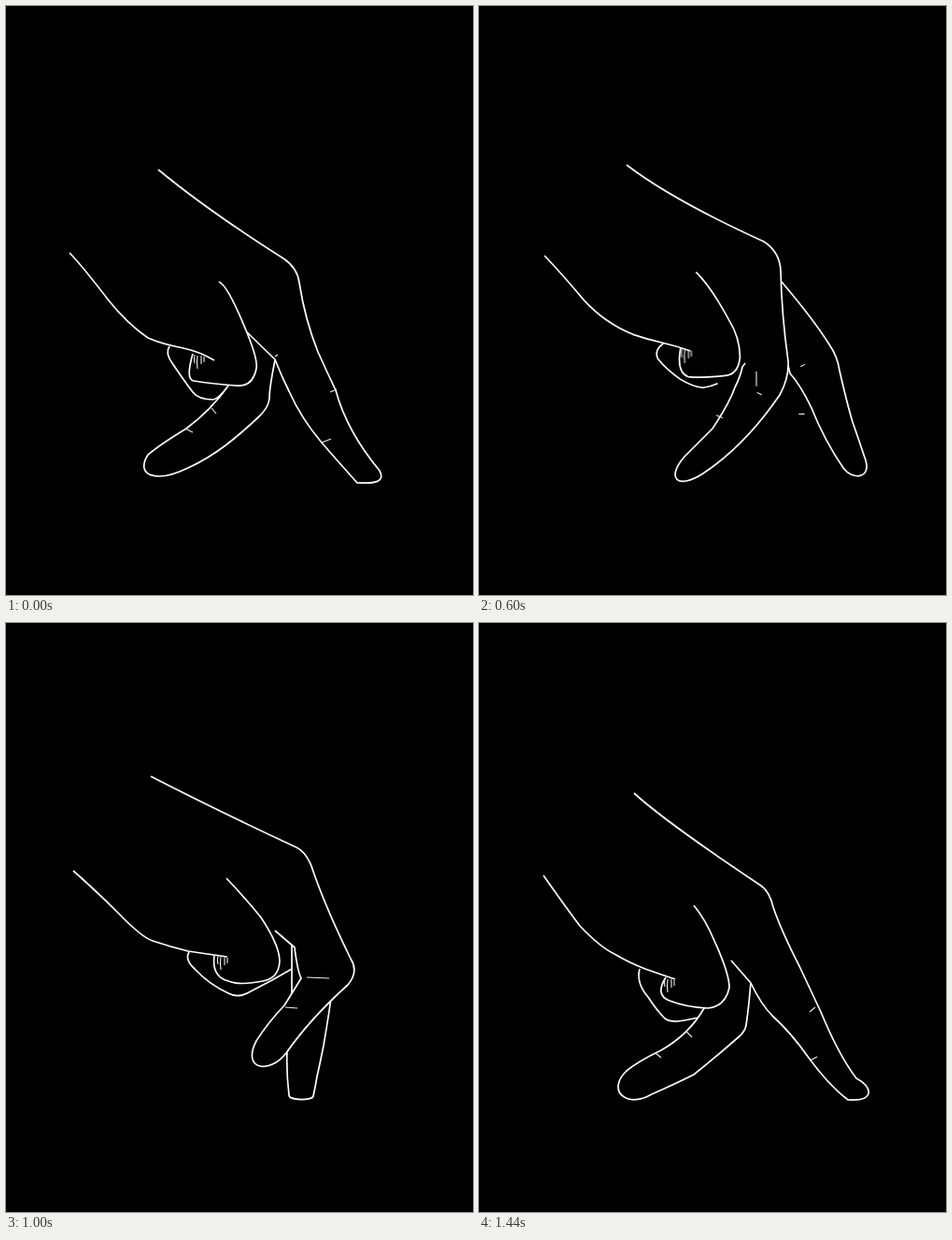
An HTML page without scripts that plays this animation: 500 px wide and 630 px high, repeating every 1.48 s.

```html
<!DOCTYPE html>
<html lang="en">
<head>
<meta charset="utf-8">
<title>Walking fingers</title>
<style>
html, body { margin: 0; height: 100%; overflow: hidden; background: #000; }
svg { display: block; width: 100vw; height: 100vh; }
path { fill: #000; stroke: #fff; stroke-width: 1.7; stroke-linejoin: round; animation: 1480ms steps(4) infinite; }
.line { fill: none; }
.fine { fill: none; stroke: #eee; stroke-width: 1.1; }
#far { animation-name: far; }
#curl { animation-name: curl; }
#near { animation-name: near; }
#thumb { animation-name: thumb; }
#palm { animation-name: palm; }
#nail { animation-name: nail; transform: translate(202px, 373px); }
#creases { animation-name: creases; }

/* Each pose is held for 40 ms; the first pose is the element's own shape. */
@keyframes far {
  10.81% { d: path("M298 428Q285 440 275 447Q262 460 249 460Q240 460 228 458Q215 457 205 458C178 456 182 424 215 423Q235 422 244 421Q262 402 281 389L283 387"); animation-timing-function: steps(6); }
  27.02% { d: path("M323 274Q365 318 383 337Q390 343 387 352Q380 398 371 427Q348 444 331 468C322 480 308 472 313 451Q325 430 337 412Q338 385 336 369L329 363"); animation-timing-function: steps(5); }
  40.54% { d: path("M324 295Q358 335 375 362Q384 375 386 390Q394 425 400 445Q408 468 414 486C420 505 400 508 390 494Q370 465 356 430Q344 405 333 393L330 380"); }
  51.35% { d: path("M323 313Q350 352 362 381Q366 390 367 405Q372 435 381 455Q390 476 402 492C411 502 404 507 381 504Q360 485 345 455Q334 436 331 419L330 415"); animation-timing-function: steps(6); }
  67.56% { d: path("M352 380Q348 400 346 415Q343 435 340 452Q336 472 333 485Q331 497 329 506C328 511 303 511 303 505Q300 480 301 457Q306 420 306 395L306 345"); animation-timing-function: steps(7); }
  86.48% { d: path("M328 386Q328 400 321 413Q306 442 300 449Q290 466 281 474Q262 490 240 504C212 519 203 497 222 480Q235 468 248 455Q270 420 277 395L278 388"); }
  97.29% { d: path("M291 384Q289 410 286 430Q285 436 280 441Q255 463 230 483Q210 493 185 504C158 520 136 500 158 479Q170 469 195 457Q225 440 241 412L242 410"); animation-timing-function: steps(1); }
}
@keyframes near {
  10.81% { d: path("M158 169Q230 219 302 256Q319 266 321 284Q324 325 337 388Q339 405 340 433Q356 490 371 507C375 514 360 513 346 511Q326 499 313 470Q306 450 296 425Q288 398 282 375L281 370"); animation-timing-function: steps(6); }
  27.02% { d: path("M157 160Q178 182 313 248Q323 253 324 276Q325 330 331 385Q332 404 326 419Q308 450 296 511C292 519 272 520 270 509Q266 485 272 448Q275 430 281 412Q283 400 280 385L279 376"); animation-timing-function: steps(5); }
  40.54% { d: path("M158 170Q208 208 305 252Q322 263 323 283Q324 330 331 380Q332 398 322 416Q285 470 240 500C212 518 200 505 220 482Q235 467 250 452Q268 425 274 408Q280 396 282 386L285 382"); }
  51.35% { d: path("M159 177Q214 220 298 256Q322 271 323 288Q322 330 331 385Q335 410 327 417Q275 443 222 473C200 485 185 476 197 456Q210 440 236 421Q258 405 277 400Q290 402 307 408L307 408"); animation-timing-function: steps(6); }
  67.56% { d: path("M155 164Q225 200 311 240Q321 245 327 260Q341 302 369 359Q378 373 366 387Q325 424 300 460C282 483 252 478 268 447Q280 428 298 409Q310 390 316 380Q312 372 309 347L288 329"); animation-timing-function: steps(7); }
  86.48% { d: path("M163 173Q208 209 300 258Q313 263 319 276Q332 303 363 351Q380 370 383 380Q394 425 413 480C420 497 400 507 390 490Q372 460 358 425Q350 405 328 386Q312 360 303 352L277 340"); }
  97.29% { d: path("M166 182Q200 213 302 281Q311 287 315 304Q324 330 343 367Q357 397 366 416Q385 462 404 487C422 496 424 512 395 510Q375 495 353 465Q334 438 314 420Q302 408 291 385L270 361"); animation-timing-function: steps(1); }
}
@keyframes curl {
  10.81% { d: path("M191 357Q186 365 194 375Q210 393 222 404Q230 412 240 409Q262 402 280 388"); animation-timing-function: steps(6); }
  27.02% { d: path("M194 350Q189 360 197 369Q212 382 226 393Q238 402 252 396Q268 391 280 381"); animation-timing-function: steps(9); }
  51.35% { d: path("M200 370Q186 374 187 384Q192 395 207 404Q220 411 230 418Q233 420 236 422"); animation-timing-function: steps(6); }
  67.56% { d: path("M196 352Q191 360 202 370Q218 387 238 396Q249 402 262 394Q284 383 306 370"); animation-timing-function: steps(7); }
  86.48% { d: path("M184 360Q181 370 191 380Q205 397 215 407Q226 416 238 410Q258 402 278 392"); }
  97.29% { d: path("M172 370Q168 385 181 400Q190 414 199 423Q206 428 220 425Q230 423 235 422"); animation-timing-function: steps(1); }
}
@keyframes thumb {
  10.81% { d: path("M233 284Q257 311 273 347Q281 365 280 378Q278 392 260 394Q235 394 217 393Q207 392 214 362"); animation-timing-function: steps(6); }
  27.02% { d: path("M229 274Q246 296 265 325Q277 340 280 370Q280 386 266 387Q240 388 221 386Q211 378 217 356"); animation-timing-function: steps(9); }
  51.35% { d: path("M235 293Q250 303 270 345Q281 366 279 380Q276 400 262 402Q240 406 226 405Q211 402 215 373"); animation-timing-function: steps(6); }
  67.56% { d: path("M236 273Q256 294 273 315Q293 345 293 362Q292 380 275 383Q250 388 238 383Q220 378 223 356"); animation-timing-function: steps(7); }
  86.48% { d: path("M234 286Q246 295 263 333Q281 366 280 378Q278 396 258 397Q235 397 220 391Q207 386 213 366"); }
  97.29% { d: path("M230 302Q243 318 252 340Q268 375 268 390Q264 410 245 412Q222 411 204 404Q188 398 200 379"); animation-timing-function: steps(1); }
}
@keyframes palm {
  10.81% { d: path("M73 264Q95 293 118 315Q145 340 163 348Q178 353 192 356Q212 360 232 369"); animation-timing-function: steps(6); }
  27.02% { d: path("M69 257Q90 278 112 306Q135 332 165 343Q180 347 195 350Q210 353 226 359"); animation-timing-function: steps(9); }
  51.35% { d: path("M71 275Q92 298 113 322Q135 345 165 358Q180 364 196 368Q212 372 227 377"); animation-timing-function: steps(6); }
  67.56% { d: path("M72 265Q98 288 120 310Q145 336 157 340Q175 346 195 351Q215 354 237 357"); animation-timing-function: steps(7); }
  86.48% { d: path("M71 267Q97 298 120 322Q143 342 163 351Q178 357 195 360Q210 362 227 368"); }
  97.29% { d: path("M69 270Q90 300 108 324Q130 347 145 354Q160 363 178 370Q195 376 210 381"); animation-timing-function: steps(1); }
}
@keyframes nail {
  10.81% { transform: translate(214px, 362px); animation-timing-function: steps(6); }
  27.02% { transform: translate(219px, 358px); animation-timing-function: steps(9); }
  51.35% { transform: translate(216px, 374px); animation-timing-function: steps(6); }
  67.56% { transform: translate(227px, 356px); animation-timing-function: steps(7); }
  86.48% { transform: translate(214px, 366px); }
  97.29% { transform: translate(199px, 380px); animation-timing-function: steps(1); }
}
@keyframes creases {
  10.81% { d: path("M329 421L336 417M309 455L316 454M246 422L251 426M222 456L226 451M295 417L299 414"); animation-timing-function: steps(6); }
  27.02% { d: path("M286 404L294 404M274 450L282 450M337 368L348 362M340 416L348 418M312 415L322 415"); animation-timing-function: steps(9); }
  51.35% { d: path("M307 421L310 425M238 428L244 433M350 400L350 400M344 453L349 451M285 372L277 400"); animation-timing-function: steps(6); }
  67.56% { d: path("M322 379L346 380M299 411L312 412M325 415L325 415M320 460L320 460M300 380L300 380"); animation-timing-function: steps(7); }
  86.48% { d: path("M349 402L360 397M371 446L380 445M265 423L275 428M246 458L253 461M320 380L320 380"); }
  97.29% { d: path("M354 416L360 411M354 468L362 464M222 437L228 443M189 460L195 465M290 380L290 380"); animation-timing-function: steps(1); }
}
</style>
</head>
<body>
<svg viewBox="0 0 500 630">
  <path id="far" d="M288 379Q282 408 282 420Q281 430 270 440Q252 457 235 470Q215 485 195 494C160 511 138 502 152 480Q165 469 193 452Q220 432 238 406L239 405"/>
  <path id="curl" d="M175 364Q170 371 178 382Q190 400 200 413Q206 421 222 421Q228 420 238 406"/>
  <path id="near" d="M163 175Q215 218 297 270Q312 280 314 296Q320 335 334 370Q343 390 353 411Q365 455 400 497C406 509 396 511 376 510Q358 490 338 467Q316 441 303 412Q295 396 288 378L256 347"/>
  <path id="thumb" d="M228 295Q237 298 257 347Q270 378 268 388Q264 408 246 406Q220 404 201 401Q192 400 200 372"/>
  <path id="palm" class="line" d="M68 264Q80 276 110 315Q130 340 152 355Q165 361 190 366Q208 370 223 379"/>
  <path id="nail" class="fine" d="M0 0q-1 5 0 9m3-8q-1 6 0 14m4-14v9m3-8v6"/>
  <path id="creases" class="fine" d="M347 413L354 410M338 467L348 463M220 430L225 436M192 452L200 456M288 375L291 373"/>
</svg>
</body>
</html>
```
